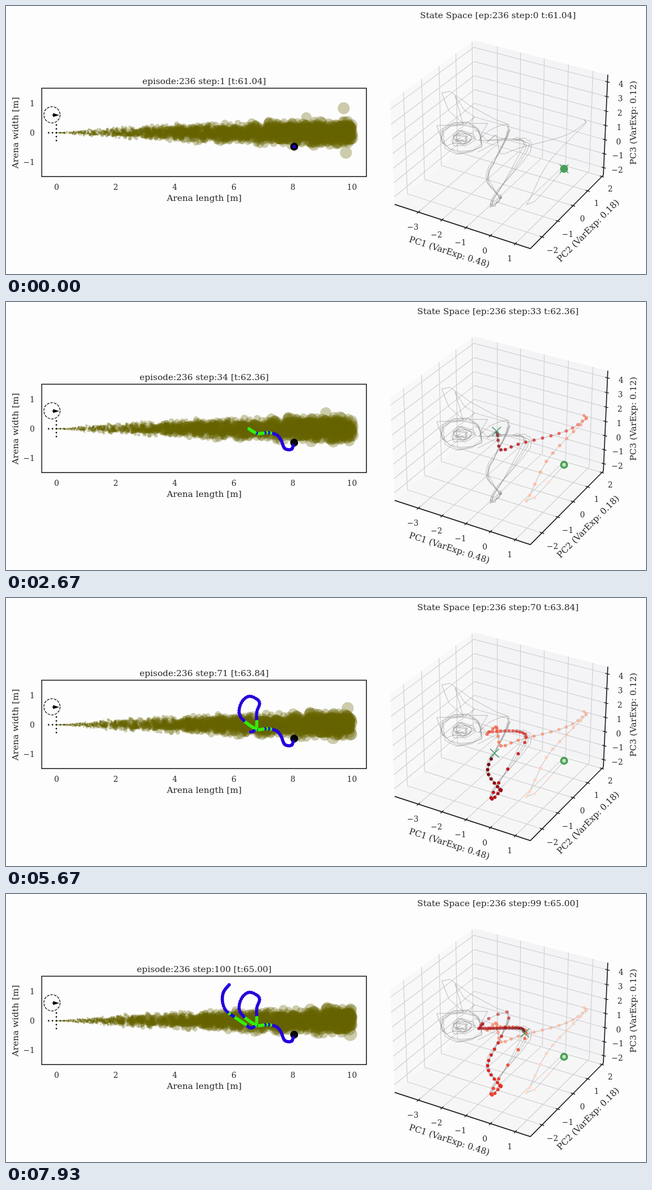
Write an HTML page with a canvas that moves like this. It is 1156 px wide and 484 px high and loops after 8000 ms.

```html
<!DOCTYPE html>
<html lang="en">
<head>
<meta charset="utf-8">
<title>Plume tracking and state space</title>
<style>
  html, body { margin: 0; width: 100%; height: 100%; overflow: hidden; background: #fdfdfd; }
  canvas, svg { position: absolute; left: 0; top: 0; width: 1156px; height: 484px; }
  text { font-family: "DejaVu Serif", "Noto Serif", serif; fill: #262626; text-anchor: middle; }
</style>
</head>
<body>
<canvas id="stage" width="1156" height="484"></canvas>
<svg id="labels" viewBox="0 0 1156 484"></svg>
<script>
const W = 1156, H = 484, LOOP = 8000, FRAMES = 120, STEPS = 100, INK = '#262626';
const ctx = document.getElementById('stage').getContext('2d');
const svg = document.getElementById('labels');
const BIG = 15.65, SMALL = 14;

function label(str, x, y, size = SMALL, angle = 0, anchor = 'middle') {
  const el = document.createElementNS('http://www.w3.org/2000/svg', 'text');
  el.textContent = str;
  el.setAttribute('y', size * 0.36);
  el.setAttribute('font-size', size);
  el.style.textAnchor = anchor;
  el.setAttribute('transform', `translate(${x} ${y}) rotate(${angle})`);
  svg.appendChild(el);
  return el;
}
const num = n => String(n).replace('-', '\u2212');
const span = (a, b) => Array.from({ length: b - a + 1 }, (_, i) => a + i);

function random(seed) {
  return () => {
    seed = (seed + 0x6D2B79F5) | 0;
    let t = Math.imul(seed ^ (seed >>> 15), 1 | seed);
    t = (t + Math.imul(t ^ (t >>> 7), 61 | t)) ^ t;
    return ((t ^ (t >>> 14)) >>> 0) / 4294967296;
  };
}

function disc(c, x, y, r, fill) {
  c.fillStyle = fill;
  c.beginPath();
  c.arc(x, y, r, 0, 7);
  c.fill();
}
function line(c, pts, color, width) {
  c.strokeStyle = color;
  c.lineWidth = width;
  c.beginPath();
  pts.forEach(p => c.lineTo(p[0], p[1]));
  c.stroke();
}

// Smooth motion through keys [step, x, y]
function follow(keys) {
  const slope = (i, c) => {
    const a = keys[Math.max(i - 1, 0)], b = keys[Math.min(i + 1, keys.length - 1)];
    return (b[c] - a[c]) / (b[0] - a[0]);
  };
  return s => {
    let i = 0;
    while (i < keys.length - 2 && keys[i + 1][0] <= s) i++;
    const a = keys[i], b = keys[i + 1], h = b[0] - a[0], t = (s - a[0]) / h, q = 1 - t;
    return [1, 2].map(c => a[c] * q * q * (1 + 2 * t) + b[c] * t * t * (3 - 2 * t) +
      h * t * q * (slope(i, c) * q - slope(i + 1, c) * t));
  };
}

const agentAt = follow([
  [1, 520.5, 254], [5, 515.5, 266], [9, 503.5, 264.5], [14, 496.5, 249], [18, 488, 239.5], [23, 471, 236],
  [28, 455, 237.5], [34, 439, 229], [39, 424, 215], [42, 421, 203], [46, 427, 186], [50, 440, 177.5],
  [54, 455, 184], [56, 458, 191], [60, 453, 206], [67, 452, 235], [71, 442, 242], [74, 432.5, 235.5],
  [81, 414, 223], [86, 397, 210], [90, 391, 194], [95, 393, 177], [100, 403, 164]
]);
const agent = span(1, STEPS).map(agentAt);
const GREEN = [[21, 21], [23, 23], [25, 28], [30, 36], [64, 68], [74, 81], [84, 84]];
const inPlume = s => GREEN.some(([a, b]) => s >= a && s <= b);

const stateAt = follow([
  [0, 1008, 294], [2, 955, 353], [3, 940, 359], [4, 946, 349], [7, 976, 288], [11, 1025, 234], [13, 1048, 211],
  [14, 1044, 205], [15, 1048, 209], [19, 1012, 233], [25, 925, 257], [28, 894, 267], [31, 888, 241], [34, 884, 233],
  [37, 869, 246], [38, 872, 242], [46, 928, 242], [50, 937, 261], [53, 890, 334], [55, 876, 361], [57, 883, 360],
  [59, 893, 347], [62, 892, 346], [67, 870, 310], [72, 895, 257], [74, 908, 224], [75, 905, 213], [77, 872, 225],
  [79, 854, 243], [80, 861, 234], [82, 856, 242], [96, 930, 243], [99, 937, 251]
]);
const states = span(0, STEPS - 1).map(stateAt);

// Unit cube in perspective; u, v, w run from the far lower corner
function cube(u, v, w) {
  const a = -0.0447 * u, b = -0.076 * v, c = -0.0382 * w, d = 1 + a + b + c;
  return [(846.7 - 4119 * a + 2605 * b + 888 * c) / d, (237.5 - 1210 * a - 1232 * b + 4655 * c) / d];
}
const uAt = n => 0.716 + 0.178 * n;
const vAt = n => 0.437 - 0.2075 * n;
const wAt = n => 0.361 + 0.1425 * n;

function face(c, corners, fill) {
  c.fillStyle = fill;
  c.beginPath();
  corners.forEach(p => c.lineTo(...cube(...p)));
  c.fill();
}

function drawSpace(c) {
  face(c, [[0,0,0], [0,1,0], [0,1,1], [0,0,1]], '#f8f8f9');
  face(c, [[0,0,0], [1,0,0], [1,0,1], [0,0,1]], '#f4f4f6');
  face(c, [[0,0,0], [1,0,0], [1,1,0], [0,1,0]], '#f6f6f7');
  const edge = (color, width, ...p) => line(c, p.map(q => cube(...q)), color, width);
  const grid = (...p) => edge('#cfcfd0', 1.2, ...p);
  const tick = (...p) => edge(INK, 1.5, ...p);
  span(-3, 1).forEach(n => {
    const u = uAt(n), [x, y] = cube(u, 1, 0);
    grid([u,1,0], [u,0,0], [u,0,1]);
    tick([u,0.982,0], [u,1.018,0]);
    label(num(n), x - 10, y + 27);
  });
  span(-2, 2).forEach(n => {
    const v = vAt(n), [x, y] = cube(1, v, 0);
    grid([1,v,0], [0,v,0], [0,v,1]);
    tick([0.985,v,0], [1.015,v,0]);
    label(num(n), x + 17 - n, y + 23 - n * 0.7);
  });
  span(-2, 4).forEach(n => {
    const w = wAt(n), [x, y] = cube(1, 0, w);
    grid([1,0,w], [0,0,w], [0,1,w]);
    tick([0.985,0,w], [1.015,0,w]);
    label(num(n), x + 24.5, y + 3.5);
  });
  edge('#1c1c1c', 1.7, [0,1,0], [1,1,0], [1,0,0], [1,0,1]);
  drawTangle(c);
}

// Faint full course: the known path, its repeats, and loops around the rest point
function drawTangle(c) {
  const thin = pts => line(c, pts, 'rgba(120,120,116,0.55)', 0.9);
  const rnd = random(5);
  thin(states);
  for (const k of [0.9, 1.08, 1.2])
    thin(states.slice(44, 75).map(([x, y]) => [888 + (x - 888) * k + 4 * rnd() - 2, y + 6 * rnd() - 4]));
  const coil = span(0, 110).map(i => {
    const a = i * 0.62, r = i < 75 ? 7 + 5 * Math.sin(i * 0.23) + 8 * rnd() : 26 + 10 * rnd();
    return [824 + r * 1.25 * Math.cos(a), 239 + r * 0.85 * Math.sin(a)];
  });
  thin([...coil, [870, 244], [885, 233]]);
  thin([[826, 212], [800, 190], [787, 157], [802, 154], [838, 180], [886, 206], [908, 214], [906, 236], [852, 264]]);
  thin([[790, 250], [778, 216], [826, 214], [811, 162], [828, 188], [846, 200], [838, 212], [870, 212], [856, 236]]);
}

// Puffs: distance along the wind at the first step, sideways draw, size factor
const WIND = 1.066, SRC = [91, 229];
const puffs = (() => {
  const rnd = random(236);
  const list = span(1, 2400).map(() => ({
    d: -107 + 641 * rnd(), g: 2 * (rnd() + rnd() + rnd() - 1.5), k: 0.75 + 0.45 * rnd()
  }));
  const strays = [[519, -4.6], [523, 3.7], [451.5, -3.1]];
  return list.concat(strays.map(([d, g]) => ({ d, g, k: 1.05 })));
})();

function drawPlume(s) {
  for (const p of puffs) {
    const d = p.d + WIND * (s - 1);
    if (d < 1 || d > 534) continue;
    const spread = 0.44 * Math.sqrt(d) * d / (d + 20);
    disc(ctx, SRC[0] + d, SRC[1] + p.g * spread, 0.6 + 0.0187 * d * p.k, 'rgba(103,100,0,0.32)');
  }
}

function drawArena(s) {
  for (const o of span(-2, 2)) {
    disc(ctx, SRC[0] + o * 7, SRC[1], 1.4, '#111');
    disc(ctx, SRC[0], SRC[1] + o * 7, 1.4, '#111');
  }
  drawPlume(s);
  ctx.setLineDash([4.6, 2]);
  ctx.strokeStyle = '#111';
  ctx.lineWidth = 1.3;
  ctx.beginPath();
  ctx.arc(83, 196.5, 14.7, 0, 7);
  ctx.stroke();
  ctx.setLineDash([]);
  line(ctx, [[83, 197], [88, 197]], '#000', 1.2);
  ctx.fillStyle = '#000';
  ctx.beginPath();
  [[85, 193.5], [96, 197], [85, 200.5]].forEach(p => ctx.lineTo(...p));
  ctx.fill();

  disc(ctx, ...agent[0], 7.2, '#000');
  for (let i = 0; i < s; i++) disc(ctx, ...agent[i], 3, inPlume(i + 1) ? '#33ee0a' : '#2200dd');
  if (s > 1) disc(ctx, ...agent[0], 3.6, '#050514');
  ctx.strokeStyle = INK;
  ctx.lineWidth = 1.7;
  ctx.strokeRect(64.5, 148.5, 586.5, 159.5);
}

const REDS = ['fff5f0', 'fee0d2', 'fcbba1', 'fc9272', 'fb6a4a', 'ef3b2c', 'cb181d', 'a50f15', '67000d']
  .map(h => [0, 2, 4].map(i => parseInt(h.slice(i, i + 2), 16)));
function reds(t, alpha) {
  const i = Math.min(7, Math.floor(t * 8)), f = t * 8 - i;
  return `rgba(${REDS[i].map((v, k) => Math.round(v + f * (REDS[i + 1][k] - v)))},${alpha})`;
}

function drawStates(k) {
  disc(ctx, ...states[0], 7.2, '#4a9f55');
  if (k) disc(ctx, ...states[0], 3.4, '#c4e3bd');
  for (let i = 1; i < k; i++) {
    const [x, y] = states[i];
    const alpha = Math.min(1, 0.55 + Math.max(0, y - 215) / 180);
    disc(ctx, x, y, 3, reds(0.1 + 0.9 * i / k, alpha));
  }
  const [x, y] = states[k], r = 7.8;
  line(ctx, [[x - r, y - r], [x + r, y + r]], '#4a9a68', 1.6);
  line(ctx, [[x - r, y + r], [x + r, y - r]], '#4a9a68', 1.6);
}

const back = document.createElement('canvas');
back.width = W;
back.height = H;
const bg = back.getContext('2d');
bg.fillStyle = '#fdfdfd';
bg.fillRect(0, 0, W, H);
bg.lineJoin = 'round';
drawSpace(bg);

const leftTitle = label('', 358, 135, BIG), rightTitle = label('', 888.5, 16.5, BIG);
span(0, 5).forEach(i => label(num(i * 2), 91.5 + i * 106.7, 327));
span(-1, 1).forEach(i => label(num(i), 52, 229 - i * 53.4, SMALL, 0, 'end'));
label('Arena length [m]', 358, 346, BIG);
label('Arena width [m]', 16.5, 229, BIG, -90);
label('PC1 (VarExp: 0.48)', 801, 443.5, BIG, 17.8);
label('PC2 (VarExp: 0.18)', 1051, 405.5, BIG, -45.2);
label('PC3 (VarExp: 0.12)', 1132.5, 211, BIG, -90);

// Frame times are rounded to 10 ms, so a frame may begin slightly early
let shown = -1;
function render(now) {
  const frame = Math.floor(((now + 4) % LOOP) * FRAMES / LOOP);
  const k = Math.floor(frame * STEPS / FRAMES);
  if (k === shown) return;
  shown = k;
  const t = (61.04 + k * 0.04).toFixed(2);
  leftTitle.textContent = `episode:236 step:${k + 1} [t:${t}]`;
  rightTitle.textContent = `State Space [ep:236 step:${k} t:${t}]`;
  ctx.drawImage(back, 0, 0);
  drawArena(k + 1);
  drawStates(k);
}
const start = performance.now();
function loop() {
  render(performance.now() - start);
  requestAnimationFrame(loop);
}
loop();
</script>
</body>
</html>
```
